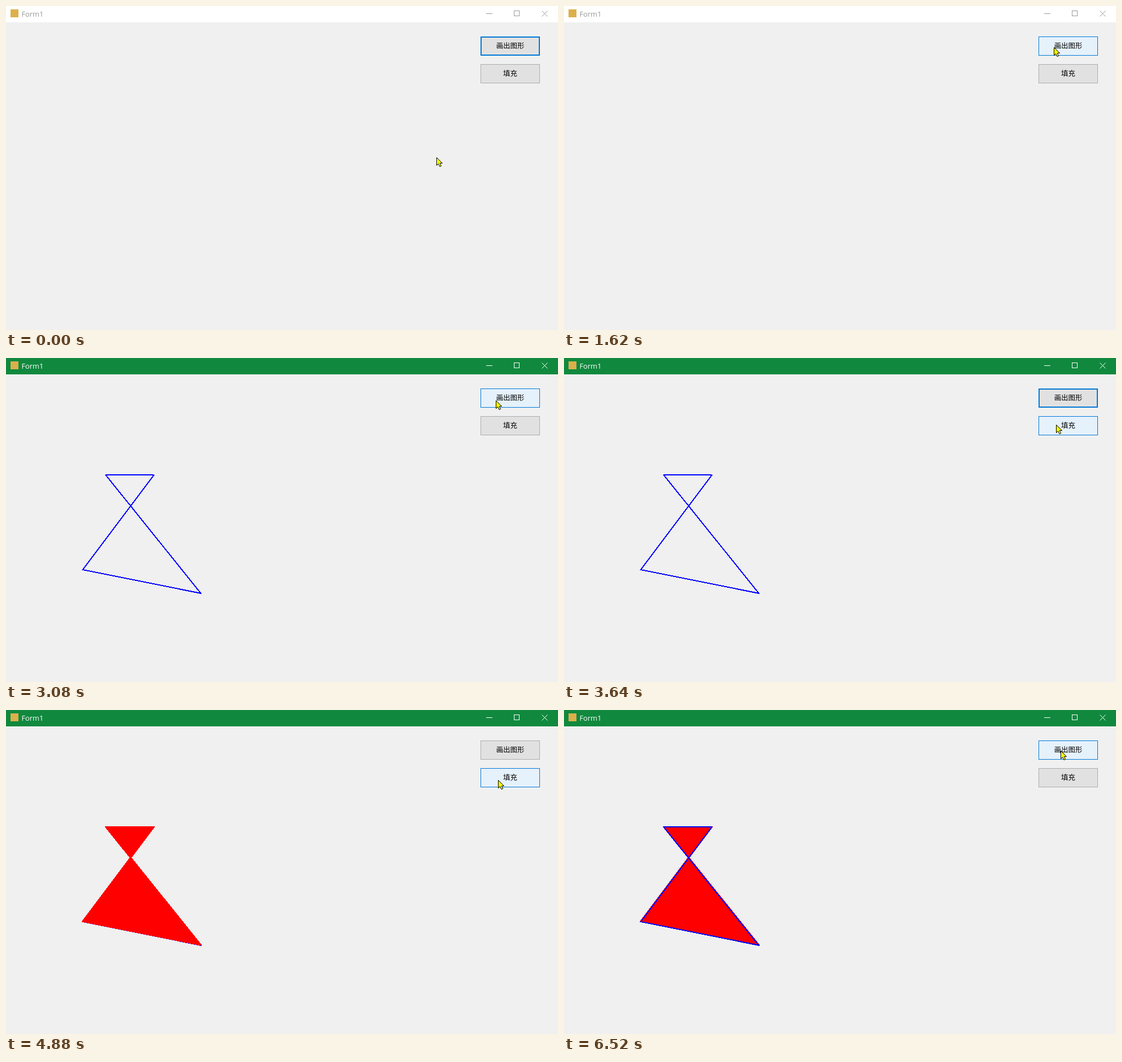
Recreate the animation shown at these times as an HTML page with a canvas. Size 976 by 574 pixels, loop 7560 ms.

```html
<!DOCTYPE html>
<html lang="zh">
<head>
<meta charset="utf-8">
<title>Form1</title>
<style>
  html, body { margin: 0; width: 100%; height: 100%; overflow: hidden; background: #f0f0f0; }
  canvas { display: block; }
</style>
</head>
<body>
<canvas id="stage" width="976" height="574"></canvas>
<script>
const ctx = document.getElementById('stage').getContext('2d');
const LOOP = 7560;

// time, x, y, number of steps to the next point
const PATH = [
  [0, 761, 268, 1], [680, 764, 262, 6], [1140, 834, 98, 1], [1230, 850, 85, 1],
  [1300, 860, 78, 1], [1380, 865, 74, 1], [1460, 866, 74, 1], [1620, 866, 73, 1],
  [3080, 866, 75, 8], [3720, 870, 124, 1], [5910, 869, 115, 5], [6290, 878, 72, 1],
  [LOOP, 878, 72, 1]
];
const ARROW = [[0, 0], [0, 14], [3, 11], [5.5, 16], [8, 15], [5.8, 10], [10, 10]];
const SHAPE = [[176.5, 207], [261.3, 207], [135.5, 375], [345, 417]];
const EDGES = SHAPE.map((p, i) => [p, SHAPE[(i + 1) % SHAPE.length]]);
const BUTTONS = [{ y: 54, label: '画出图形' }, { y: 103, label: '填充' }];
const BTN = { x: 839, w: 105, h: 34 };
const PRESSES = [
  { from: 2070, to: 2220, button: 0 },
  { from: 4650, to: 4730, button: 1 },
  { from: 6370, to: 6520, button: 0 }
];
const DRAWN = 2220, FILL_START = 4730, FILL_END = 4880, REDRAWN = 6520;

function rect(color, x, y, w, h) {
  ctx.fillStyle = color;
  ctx.fillRect(x, y, w, h);
}

function text(str, x, y, font, color, align) {
  ctx.font = font;
  ctx.fillStyle = color;
  ctx.textAlign = align;
  ctx.fillText(str, x, y);
}

function tracePoints(points, dx, dy) {
  ctx.beginPath();
  points.forEach(([x, y]) => ctx.lineTo(x + dx, y + dy));
  ctx.closePath();
}

function pointerAt(t) {
  let i = 0;
  while (i < PATH.length - 2 && t >= PATH[i + 1][0]) i++;
  const [t0, x0, y0, steps] = PATH[i];
  const [t1, x1, y1] = PATH[i + 1];
  const u = Math.floor((t - t0) / (t1 - t0) * steps) / steps;
  return { x: Math.round(x0 + (x1 - x0) * u), y: Math.round(y0 + (y1 - y0) * u) };
}

function drawTitleBar(active) {
  const ink = active ? '#fff' : '#999';
  rect(active ? '#10893e' : '#fff', 0, 0, 976, 29);
  rect('#dcb04a', 8, 6, 14, 14);
  text('Form1', 27.5, 18.5, '12.8px "Open Sans", "Noto Sans", sans-serif', ink, 'left');
  ctx.strokeStyle = ink;
  ctx.lineWidth = 1;
  ctx.strokeRect(898.5, 8.5, 9, 9);
  ctx.beginPath();
  ctx.moveTo(849, 13.5); ctx.lineTo(860, 13.5);
  ctx.moveTo(947.5, 8.5); ctx.lineTo(957.5, 18.5);
  ctx.moveTo(957.5, 8.5); ctx.lineTo(947.5, 18.5);
  ctx.stroke();
}

function drawButton({ y, label }, { hot, pressed, focused }) {
  const [border, face] = pressed ? ['#005499', '#cce4f7']
    : hot ? ['#0078d7', '#e5f1fb']
    : [focused ? '#0078d7' : '#adadad', '#e1e1e1'];
  const b = focused && !hot && !pressed ? 2 : 1;
  rect(border, BTN.x, y, BTN.w, BTN.h);
  rect(face, BTN.x + b, y + b, BTN.w - 2 * b, BTN.h - 2 * b);
  text(label, BTN.x + BTN.w / 2, y + 21,
    '12.4px "Noto Sans CJK SC", "Noto Sans CJK", sans-serif', '#000', 'center');
}

// Two-pixel line without smoothing
function drawEdge([[x0, y0], [x1, y1]]) {
  const dx = x1 - x0, dy = y1 - y0;
  const flat = Math.abs(dx) > Math.abs(dy);
  const major = Math.max(Math.abs(dx), Math.abs(dy));
  const half = Math.hypot(dx, dy) / major;
  for (let i = 0; i <= major; i++) {
    const x = x0 + dx * i / major, y = y0 + dy * i / major;
    const mid = flat ? y : x;
    const a = Math.round(mid - half), size = Math.round(mid + half) - a;
    if (flat) rect('#00f', Math.floor(x), a, 1, size);
    else rect('#00f', a, Math.floor(y), size, 1);
  }
}

function fillShape(progress) {
  const last = 207 + 210 * progress;
  for (let y = 207; y < last; y++) {
    const xs = EDGES
      .filter(([a, b]) => y >= Math.min(a[1], b[1]) && y < Math.max(a[1], b[1]))
      .map(([a, b]) => a[0] + (b[0] - a[0]) * (y - a[1]) / (b[1] - a[1]))
      .sort((p, q) => p - q);
    for (let i = 0; i + 1 < xs.length; i += 2) {
      const left = Math.round(xs[i] - 1.5);
      rect('#f00', left, y - 1, Math.round(xs[i + 1] + 1.5) - left, 2);
    }
  }
}

function drawPointer({ x, y }, halo) {
  if (halo) {
    ctx.fillStyle = 'rgba(255, 255, 0, 0.5)';
    ctx.beginPath();
    ctx.arc(x, y, 12.5, 0, Math.PI * 2);
    ctx.fill();
  }
  tracePoints(ARROW, x + 0.5, y + 0.5);
  ctx.fillStyle = '#ff0';
  ctx.fill();
  ctx.strokeStyle = '#000';
  ctx.lineWidth = 1;
  ctx.stroke();
}

function render(t) {
  const pointer = pointerAt(t);
  const press = PRESSES.find(p => t >= p.from && t < p.to);
  const started = PRESSES.filter(p => t >= p.from);
  const focus = started.length ? started[started.length - 1].button : 0;

  rect('#f0f0f0', 0, 0, 976, 574);
  drawTitleBar(started.length > 0);
  BUTTONS.forEach((button, i) => drawButton(button, {
    hot: pointer.x >= BTN.x && pointer.y >= button.y && pointer.y < button.y + BTN.h,
    pressed: Boolean(press) && press.button === i,
    focused: focus === i
  }));

  if (t >= DRAWN) EDGES.forEach(drawEdge);
  if (t >= FILL_START) {
    const step = Math.floor((t - FILL_START) / (FILL_END - FILL_START) * 2);
    fillShape(Math.min(1, (step + 1) / 3));
  }
  if (t >= REDRAWN) EDGES.forEach(drawEdge);
  drawPointer(pointer, press);
}

function tick() {
  render(performance.now() % LOOP);
  requestAnimationFrame(tick);
}
tick();
</script>
</body>
</html>
```
